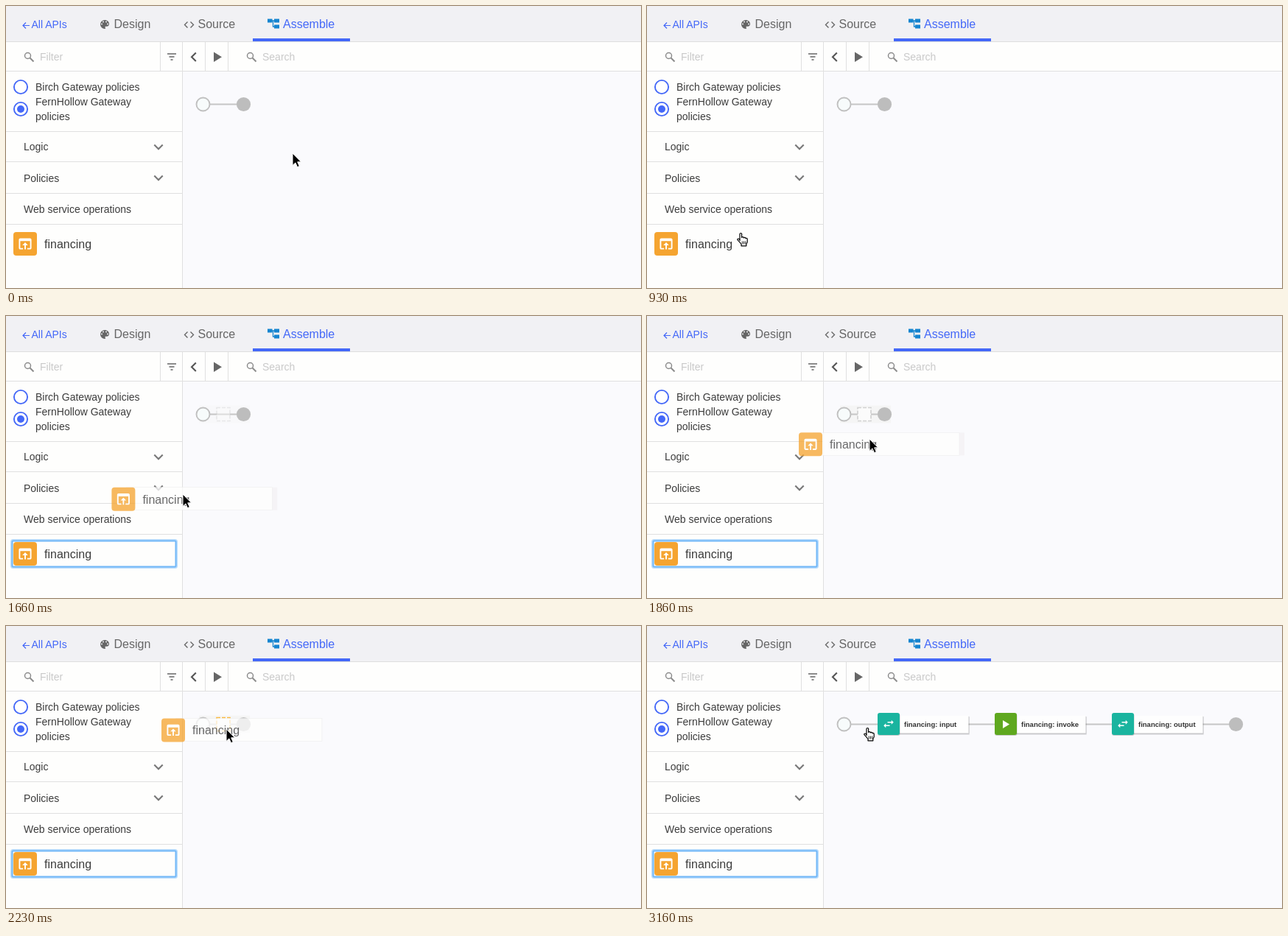
Recreate the animation shown at these times as an HTML page. Size 862 px wide and 383 px high, loop 3200 ms.

```html
<!DOCTYPE html>
<html lang="en">
<head>
<meta charset="utf-8">
<title>Assemble policies</title>
<style>
html, body { margin: 0; width: 100%; height: 100%; overflow: hidden; background: #fafafd; }
svg { display: block; width: 862px; height: 383px; font: 14px "Liberation Sans", Arial, sans-serif; }
</style>
</head>
<body>
<svg id="stage" viewBox="0 0 862 383" xmlns="http://www.w3.org/2000/svg"></svg>
<script>
const LOOP = 3200;
const BLUE = '#4468f8';

const rect = (x, y, w, h, fill, more = '') =>
  `<rect x="${x}" y="${y}" width="${w}" height="${h}" fill="${fill}" ${more}/>`;
const text = (x, y, label, fill = '#3c3c3c', size = 14, more = '') =>
  `<text x="${x}" y="${y}" fill="${fill}" font-size="${size}" ${more}>${label}</text>`;
const line = (d, color, width = 1, more = '') =>
  `<path d="${d}" fill="none" stroke="${color}" stroke-width="${width}" ${more}/>`;
const circle = (x, y, r, fill, more = '') =>
  `<circle cx="${x}" cy="${y}" r="${r}" fill="${fill}" ${more}/>`;
const group = (id, body, more = '') => `<g id="${id}" ${more}>${body}</g>`;

const magnifier = x =>
  circle(x + 4.5, 67.5, 4, 'none', 'stroke="#8c8c8c" stroke-width="1.5"') +
  line(`M${x + 7.5} 70.5l5 5`, '#8c8c8c', 1.9);
const chevron = y => line(`M201.3 ${y - 3}l5.7 5.7 5.7-5.7`, '#777', 2.1);

// Policy tile, relative to the top left corner of its icon
const policy = () =>
  rect(0, 0, 32, 32, '#f5a430', 'rx="4"') +
  `<path transform="translate(4.6 4.6) scale(.95)" fill="#fff" d="M19 4H5c-1.1 0-2 .9-2 2v12c0 1.1.9 2 2 2h4v-2H5V8h14v10h-4v2h4c1.1 0 2-.9 2-2V6c0-1.1-.9-2-2-2zm-7 6l-4 4h3v6h2v-6h3z"/>` +
  text(42, 22, 'financing', '#3c3c3c', 16);

const swapIcon = '<path transform="translate(6 6) scale(.75)" fill="#fff" d="M7 11l-4 4 4 4v-3h7v-2H7zM21 9l-4-4v3h-7v2h7v3z"/>';
const playIcon = '<path fill="#fff" d="M11 10v11l9-5.5z"/>';
const nodes = [
  { label: 'input', color: '#1ab49f', icon: swapIcon },
  { label: 'invoke', color: '#5fa81f', icon: playIcon },
  { label: 'output', color: '#1ab49f', icon: swapIcon }
];
const nodeMarkup = ({ label, color, icon }, i) => group('node' + i,
  rect(28, 5, 97, 25, '#000', 'opacity=".08" rx="1"') +
  rect(28, 4.5, 96.5, 24.5, '#000', 'opacity=".13" rx="1"') +
  rect(28, 3.5, 95.5, 24, '#fefefe') +
  text(36, 18.5, 'financing: ' + label, '#333', 9.5, 'font-weight="bold"') +
  group('icon' + i,
    rect(0, 1, 30.5, 30, '#000', 'opacity=".18" rx="3"') +
    rect(0, 0, 30, 30, color, 'rx="3"') + icon));

const header =
  rect(0, 0, 862, 48, '#f1f1f4') + line('M0 48.5H862', '#dedede') +
  rect(335, 44, 132, 4, BLUE) +
  line('M32 26.5H23.5M27 22.5l-4 4 4 4', BLUE, 1.2) + text(34.5, 30, 'All APIs', BLUE) +
  `<path transform="translate(126 17) scale(.667)" fill="#666" fill-rule="evenodd" d="M12 3a9 9 0 0 0 0 18c.8 0 1.5-.7 1.5-1.5 0-1-.8-1.2-.8-2s.7-1.5 1.5-1.5H16a5 5 0 0 0 5-5c0-4.4-4-8-9-8z"/>` +
  [[130, 24.5], [132, 21.5], [136, 21.5], [138, 24.5]].map(([x, y]) => circle(x, y, 1, '#f1f1f4')).join('') +
  text(146.5, 30, 'Design', '#666', 16) +
  line('M246.500 21.500l-4 4 4 4M250.500 21.500l4 4-4 4', '#666', 1.4) +
  text(260.500, 30, 'Source', '#666', 16) +
  line('M360 20H366M362.500 20V28H366', '#1685d0', 1.3) +
  rect(355, 17.5, 6.5, 5, '#1685d0') + rect(364, 17.5, 7, 5, '#1685d0') + rect(364, 25.500, 7, 5, '#1685d0') +
  text(376, 30, 'Assemble', BLUE, 16);

const toolbar =
  rect(0, 49, 862, 39, '#fefefd') +
  magnifier(25) + text(46, 74, 'Filter', '#c9c9c9') +
  line('M219 65H231M221.500 69H228.500M223.500 73H226.500', '#666', 1.4) +
  line('M257.800 63.500L252 69.300l5.800 5.800', '#555', 2.1) +
  '<path d="M282 62.500v13.500l11-6.700z" fill="#666"/>' +
  magnifier(327) + text(348, 74, 'Search', '#c9c9c9');

const sidebar =
  rect(0, 89, 239, 294, '#fefefd') +
  line('M0 88.500H862M209.500 49V88M239.500 49V383M270.500 49V88M301.500 49V88', '#e0e0e0') +
  line('M0 170.500H239M0 211.500H239M0 254.500H239M0 296.500H239', '#e0e0e0') +
  [110, 140].map(y => circle(20, y, 9.1, '#fff', `stroke="${BLUE}" stroke-width="1.900"`)).join('') +
  circle(20, 140, 5, BLUE) +
  text(40, 115, 'Birch Gateway policies') +
  text(40, 135, 'FernHollow Gateway') + text(40, 155, 'policies') +
  text(24, 196, 'Logic') + chevron(191.500) +
  text(24, 238.500, 'Policies') + chevron(233.500) +
  text(24, 280.500, 'Web service operations') +
  group('focus',
    rect(7.500, 304.500, 224, 37, 'none', 'rx="2" stroke="#b9dcfc" stroke-width="3"') +
    rect(8.500, 305.500, 222, 35, 'none', 'rx="1" stroke="#72b8f8" stroke-width="2"')) +
  group('tile', policy(), 'transform="translate(10 307)"');

const flow =
  group('slot', rect(262, 121.500, 69, 24, '#f4f4f4', 'opacity=".8"')) +
  line('', '#c6c6c6', 1.8, 'id="wire"') +
  group('dash',
    rect(286, 124.500, 18, 18, '#fbfbfb') +
    rect(286, 124.500, 18, 18, 'none', 'id="dashEdge" stroke-width="1.700" stroke-dasharray="5 2"')) +
  circle(267.500, 133.500, 9, '#f7fbfb', 'stroke="#c0c0c0" stroke-width="1.900"') +
  circle(322.500, 133.500, 9.600, '#bdbdbd', 'id="end"') +
  nodes.map(nodeMarkup).join('');

const ghost = group('ghost',
  rect(218, 0, 7, 31, '#f4f2f5', 'id="trail"') +
  rect(20, 0, 198, 31, '#fefefe', 'stroke="#ececec" stroke-width=".7"') + policy(), 'opacity=".76"');

const cursors =
  group('arrow', '<path d="M0 0V16.500L3.900 12.900 6.500 18.700 9.300 17.500 6.700 11.800H11.600Z" fill="#000" stroke="#fff" stroke-width="1"/>') +
  group('hand',
    '<path transform="translate(-6 0)" d="M4 11V1.800Q4 .5 5.300 .5T6.600 1.800V6.500Q6.800 5.500 8 5.600T9.300 7Q9.600 6.200 10.700 6.400T11.900 7.700Q12.400 7 13.300 7.400T14.200 9V12.500L12.800 15.500V17.800H6V15.500L3.500 12.300 .9 9.600Q.6 8 2 8T4 10" fill="#fff" stroke="#000" stroke-width="1.200" stroke-linejoin="round"/>' +
    line('M1.300 11.500v4M3.500 11.500v4M5.700 11.500v4', '#000', .9));

const stage = document.getElementById('stage');
stage.innerHTML = header + toolbar + sidebar + flow + ghost + cursors;
const el = id => document.getElementById(id);
const parts = Object.fromEntries([...stage.querySelectorAll('[id]')].map(e => [e.id, e]));

const pointerTrack = [
  [0, 389, 200], [260, 389, 200], [560, 188.500, 267], [760, 136, 304], [800, 136, 304],
  [1230, 100.500, 322], [1400, 100.500, 322], [1660, 239.500, 242], [1860, 302, 167],
  [1930, 303, 163], [2230, 299.500, 140], [2360, 297.500, 138], [2560, 297.500, 138],
  [2700, 299.500, 138], [LOOP, 299.500, 138]
];
const ghostTrack = [
  [1400, 10, 307], [1660, 143, 233], [1860, 206, 158.500], [1930, 207, 150],
  [2230, 211, 125.500], [2360, 207, 123], [LOOP, 207, 123]
];

const clamp = v => Math.max(0, Math.min(1, v));
const ramp = (t, from, to) => clamp((t - from) / (to - from));
const smooth = p => p * p * (3 - 2 * p);

// Cubic through the key points, flat wherever a direction turns or rests
function follow(track, t) {
  const last = track.length - 1;
  let i = 0;
  while (i < last - 1 && t >= track[i + 1][0]) i++;
  const slope = (k, axis) => k < 0 || k >= last ? 0 :
    (track[k + 1][axis] - track[k][axis]) / (track[k + 1][0] - track[k][0]);
  const tangent = (k, axis) => {
    const a = slope(k - 1, axis), b = slope(k, axis);
    return a * b > 0 ? 2 * a * b / (a + b) : 0;
  };
  const span = track[i + 1][0] - track[i][0];
  const u = clamp((t - track[i][0]) / span);
  return [1, 2].map(axis => {
    const from = track[i][axis], to = track[i + 1][axis];
    return from + (to - from) * smooth(u) + span * u * (1 - u) *
      ((1 - u) * tangent(i, axis) - u * tangent(i + 1, axis));
  });
}

const show = (part, on) => part.setAttribute('visibility', on ? 'visible' : 'hidden');
const place = (part, [x, y]) => part.setAttribute('transform', `translate(${x.toFixed(2)} ${y.toFixed(2)})`);
const fade = (part, value) => part.setAttribute('opacity', value.toFixed(3));

function render(t) {
  const pointer = follow(pointerTrack, t);
  const dropped = t >= 2560;
  const isHand = (t < 1200 && pointer[0] < 240) || dropped;
  place(parts.arrow, pointer.map(Math.round));
  place(parts.hand, pointer.map(Math.round));
  show(parts.arrow, !isHand);
  show(parts.hand, isHand);
  fade(parts.focus, ramp(t, 1170, 1250));

  place(parts.ghost, follow(ghostTrack, t));
  show(parts.ghost, t >= 1430 && !dropped);
  show(parts.trail, t >= 1430 && t < 1930);

  const slot = dropped ? 0 : ramp(t, 1560, 1800);
  fade(parts.slot, slot);
  fade(parts.dash, slot);
  parts.dashEdge.setAttribute('stroke', t < 2080 ? '#d2d2d2' : '#fbb93c');

  const spread = smooth(ramp(t, 2560, 3000));
  const endX = 322.500 + 477 * spread;
  parts.end.setAttribute('cx', endX);
  parts.wire.setAttribute('d', `M277 133.500H${endX - 9}`);
  nodes.forEach((node, i) => {
    place(parts['node' + i], [280 + (33 + 159 * i) * spread, 118]);
    fade(parts['node' + i], ramp(t, 2600, 2960));
    fade(parts['icon' + i], .85 + .15 * ramp(t, 3080, 3150));
  });
}

const start = performance.now();
function tick() {
  render((performance.now() - start) % LOOP);
  requestAnimationFrame(tick);
}
tick();
</script>
</body>
</html>
```
